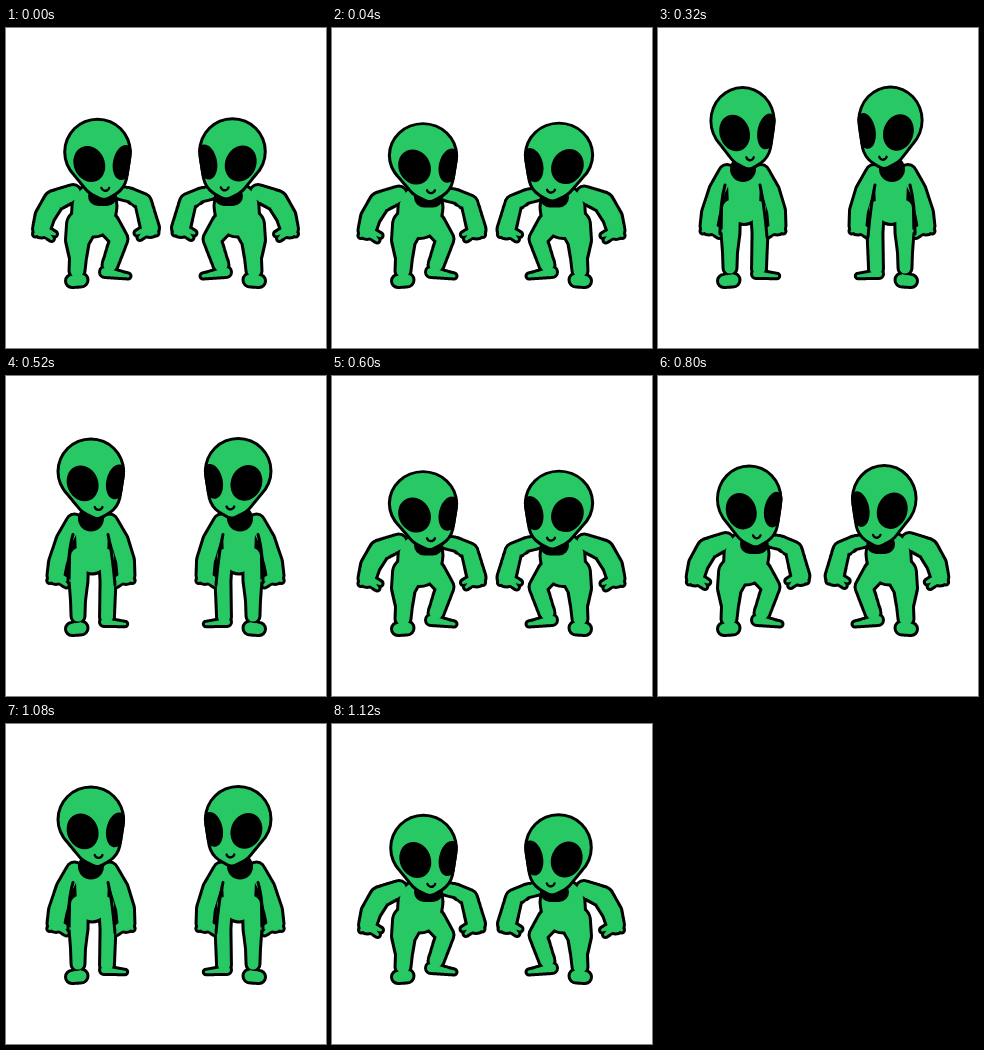
Write an HTML page with a canvas that moves like this. It is 320 by 320 pixels and loops after 1160 ms.

```html
<!DOCTYPE html>
<html lang="en">
<head>
<meta charset="utf-8">
<title>Dancing aliens</title>
<style>
html, body { margin: 0; width: 100%; height: 100%; overflow: hidden; background: #fff; }
canvas { display: block; width: 100vw; height: 100vh; }
</style>
</head>
<body>
<canvas id="stage" width="320" height="320"></canvas>
<script>
const ctx = document.getElementById('stage').getContext('2d');
const GREEN = '#28c965', BLACK = '#000', LINE = 3;
const LOOP = 1160, BEAT = 560;

// Every part is a chain of joints: [x, y, radius]
const HEAD = [[91.5, 124, 34.3], [97.5, 146, 25], [98, 163.5, 9.5]];
const LEFT_FOOT = [[66, 253, 8], [75, 252, 8.5]];

const bent = {
  mid: 90,
  torso: [[88.5, 178, 24], [87.5, 187, 23.5]],
  leftArm: [[67, 165, 10], [48, 173, 12], [39, 188, 11.5], [35.5, 201, 10.5]],
  rightArm: [[114, 165, 8], [124, 167, 8.5], [137, 174, 10], [144, 200, 11]],
  leftLeg: [[76, 197, 17], [71.5, 212, 13.5], [72, 230, 10], [71, 243, 9.5]],
  rightLeg: [[102, 196, 13], [113, 211, 10.5], [104, 237, 9.5]],
  rightFoot: [[99, 244, 7], [122, 248, 4.5]],
  neck: [[92, 168, 10], [101, 168, 10]],
  creases: []
};

const upright = {
  mid: 86,
  torso: [[86, 156, 19], [86, 180, 18]],
  leftArm: [[69, 145, 10], [60, 162, 10.5], [53, 185, 11], [51, 198, 10.5]],
  rightArm: [[103, 145, 10], [112, 163, 11], [118, 183, 11], [119, 198, 10.5]],
  leftLeg: [[73, 180, 11], [72.5, 205, 11], [72, 225, 9], [72, 240, 8.5]],
  rightLeg: [[101, 180, 10], [102, 205, 9.5], [101, 241, 9]],
  rightFoot: [[98, 246, 6], [119, 248, 4.2]],
  neck: [[85, 141, 13]],
  creases: [[67, 157, 62, 175, 62, 206], [102, 157, 106, 175, 109, 209]]
};

// Head: chin anchor, scale and turn; body: arm spread and drop
const poses = {
  crouch: { body: bent, x: 91.5, y: 173, sx: 1.025, sy: 0.97, spread: 1.01, drop: 1.5, turn: 1 },
  rise: { body: bent, x: 91.7, y: 170.5, sx: 0.97, sy: 1.01, spread: 0.97, drop: 0, turn: 1.5 },
  dip: { body: bent, x: 92, y: 171, sx: 1, sy: 1, spread: 1, drop: 0, turn: 1 },
  lift: { body: upright, x: 85.3, y: 142, sx: 1, sy: 0.99, spread: 1.03, drop: 1.5, turn: 2 },
  tall: { body: upright, x: 85, y: 140.5, sx: 0.965, sy: 1.015, spread: 1, drop: 0, turn: 2 }
};

function poseAt(t) {
  const u = (t + BEAT - 40) % BEAT;
  if (u < 200) return poses.crouch;
  if (u < 240) return poses.rise;
  if (u < 280) return poses.lift;
  if (u < 480) return poses.tall;
  return u < 520 ? poses.lift : poses.dip;
}

// Sweeps a circle of changing radius along the joints
function sweep(joints, inset = 0) {
  const path = new Path2D();
  const steps = 30;
  joints.forEach((a, i) => {
    const b = joints[i + 1] || a;
    for (let k = 0; k < steps; k++) {
      const [x, y, r] = a.map((v, j) => v + (b[j] - v) * k / steps);
      path.moveTo(x + r - inset, y);
      path.arc(x, y, r - inset, 0, Math.PI * 2);
    }
  });
  return path;
}

function fill(path, color) {
  ctx.fillStyle = color;
  ctx.fill(path);
}

// Outlines the parts as one joined shape
function paint(parts) {
  parts.forEach(part => fill(sweep(part), BLACK));
  parts.forEach(part => fill(sweep(part, LINE), GREEN));
}

// Heel of the hand and two fingers; side points towards the body
function hand(arm, side) {
  const [x, y] = arm[arm.length - 1];
  const finger = (dx, dy, r) => [[x, y, 7], [x + side * dx, y + dy, r]];
  return [finger(-6, 5, 4.5), finger(10, 9.5, 4.5), finger(13, 5, 4.5)];
}

function drawBody({ body, spread, drop }) {
  const { mid, leftArm, rightArm } = body;
  const place = joints => joints.map(([x, y, r]) => [mid + (x - mid) * spread, y + drop, r]);
  const upper = [body.torso, leftArm, rightArm, ...hand(leftArm, 1), ...hand(rightArm, -1)];
  paint([...upper.map(place), body.leftLeg, LEFT_FOOT, body.rightLeg, body.rightFoot]);
  body.creases.forEach(([x, y, ...bend]) => {
    ctx.beginPath();
    ctx.moveTo(x, y + drop);
    ctx.quadraticCurveTo(...bend);
    ctx.stroke();
  });
  fill(sweep(place(body.neck)), BLACK);
}

function eye(x, y, rx, ry, tilt) {
  ctx.beginPath();
  ctx.ellipse(x, y, rx, ry, tilt, 0, Math.PI * 2);
  ctx.fill();
}

function drawHead({ x, y, sx, sy }) {
  ctx.translate(x, y);
  ctx.scale(sx, sy);
  ctx.translate(-92, -171);
  paint([HEAD]);
  ctx.clip(sweep(HEAD));
  ctx.fillStyle = BLACK;
  eye(83.3, 136, 15.5, 18.5, -0.4);
  eye(117.5, 134.5, 10.5, 17.8, 0.2);
  ctx.lineWidth = 2.4;
  ctx.beginPath();
  ctx.arc(99.3, 158.8, 4, 0.3, Math.PI - 0.3);
  ctx.stroke();
}

function drawAlien(pose, mirrored) {
  ctx.save();
  if (mirrored) {
    ctx.translate(319, 0);
    ctx.scale(-1, 1);
  }
  drawBody(pose);
  if (mirrored) ctx.translate(pose.turn, -0.5);
  drawHead(pose);
  ctx.restore();
}

function frame() {
  const pose = poseAt(performance.now() % LOOP);
  ctx.fillStyle = '#fff';
  ctx.fillRect(0, 0, 320, 320);
  ctx.strokeStyle = BLACK;
  ctx.lineWidth = LINE;
  ctx.lineCap = 'round';
  drawAlien(pose, false);
  drawAlien(pose, true);
  requestAnimationFrame(frame);
}
frame();
</script>
</body>
</html>
```
